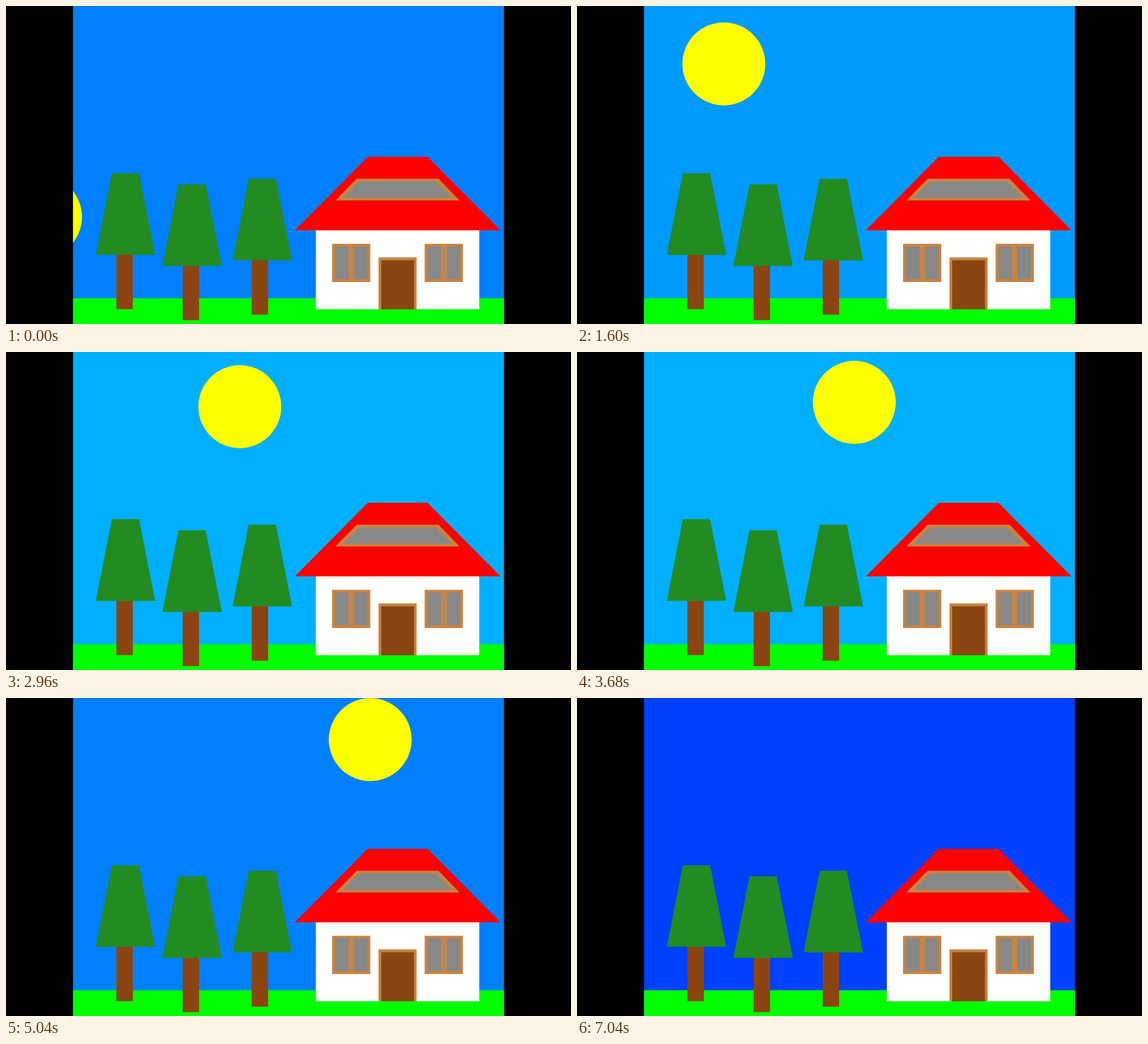
Animation of 998x561 px, one loop 7.12 s. Source, as an HTML page with a canvas:

```html
<!DOCTYPE html>
<html lang="en">
<head>
<meta charset="utf-8">
<title>House and sun</title>
<style>
  html, body { margin: 0; width: 100%; height: 100%; overflow: hidden; background: #000; }
  canvas { display: block; }
</style>
</head>
<body>
<canvas id="stage" width="998" height="561"></canvas>
<script>
const ctx = document.getElementById('stage').getContext('2d');

const LOOP = 7120;
const FRAME = 80;
const STEP = 87;
const PHASE = 45;
const UNIT = 0.96;
const SUNSET = 6520;

// Sky colour from a given step of the sun onward
const SKY = [
  [0, '#0080ff'], [14, '#009aff'], [24, '#00b0ff'], [44, '#00c4ff'],
  [54, '#0080ff'], [64, '#0060ff'], [74, '#0040ff']
];
const LIGHTS_ON = 64;
const LAST_STEP = 74;

const WOOD = '#c88441';
const BARK = '#8b4513';
const LEAF = '#228b22';

function rect(color, left, top, right, bottom) {
  ctx.fillStyle = color;
  ctx.fillRect(left, top, right - left, bottom - top);
}

// Trapezium given by its top and bottom edges
function trapezium(color, top, tl, tr, bottom, bl, br) {
  ctx.fillStyle = color;
  ctx.beginPath();
  ctx.moveTo(tl, top);
  ctx.lineTo(tr, top);
  ctx.lineTo(br, bottom);
  ctx.lineTo(bl, bottom);
  ctx.fill();
}

function tree(trunk, crown, top) {
  rect(BARK, trunk, top + 143, trunk + 29, top + 239.7);
  trapezium(LEAF, top, crown, crown + 48, top + 144, crown - 28.5, crown + 76.5);
}

function windowAt(x, glass) {
  rect(WOOD, x, 419.5, x + 67.5, 487);
  rect(glass, x + 5, 424, x + 29, 482);
  rect(glass, x + 38.5, 424, x + 62.5, 482);
}

function house(glass) {
  rect('#fff', 547.3, 395, 836, 535);
  trapezium('#f00', 266, 639, 744.5, 395.7, 510, 873.5);
  trapezium(WOOD, 304.7, 619.5, 764, 343, 582, 801);
  trapezium(glass, 309.5, 624, 759.5, 338.3, 595, 788);
  windowAt(576, glass);
  windowAt(739.5, glass);
  rect(WOOD, 658, 443.5, 725.3, 535);
  rect(BARK, 662.7, 448.5, 720.7, 535);
}

// Steep rise, gentle rise, level stretch, gentle rise
function sunPosition(n) {
  if (n < 13) return [61 + n * 150.4 / 13, 372 - n * 265 / 13];
  const climb = Math.min(n - 13, 11) + Math.max(n - 34, 0);
  return [211.4 + (n - 13) * 10 * UNIT, 107 - climb * UNIT];
}

function sun(n) {
  const [x, y] = sunPosition(n);
  ctx.fillStyle = '#ff0';
  ctx.beginPath();
  ctx.arc(x, y, 73.2, 0, Math.PI * 2);
  ctx.fill();
}

function draw(time) {
  const t = Math.floor((time % LOOP) / FRAME) * FRAME;
  const n = Math.min(Math.floor((t + PHASE) / STEP), LAST_STEP);
  const day = t < SUNSET;
  const sky = SKY.filter(([from]) => from <= n).pop()[1];

  rect('#000', 0, 0, 998, 561);
  ctx.save();
  ctx.beginPath();
  ctx.rect(118.4, 0, 761.2, 561);
  ctx.clip();
  rect(sky, 118, 0, 880, 561);
  if (day) sun(n);
  rect('#0f0', 118, 515.6, 880, 561);
  tree(195, 187, 295);
  tree(312, 304.7, 314.5);
  tree(434, 428.7, 304.8);
  house(day && n >= LIGHTS_ON ? '#ff0' : '#888');
  ctx.restore();
}

const start = performance.now();
function tick() {
  draw(performance.now() - start);
  requestAnimationFrame(tick);
}
tick();
</script>
</body>
</html>
```
